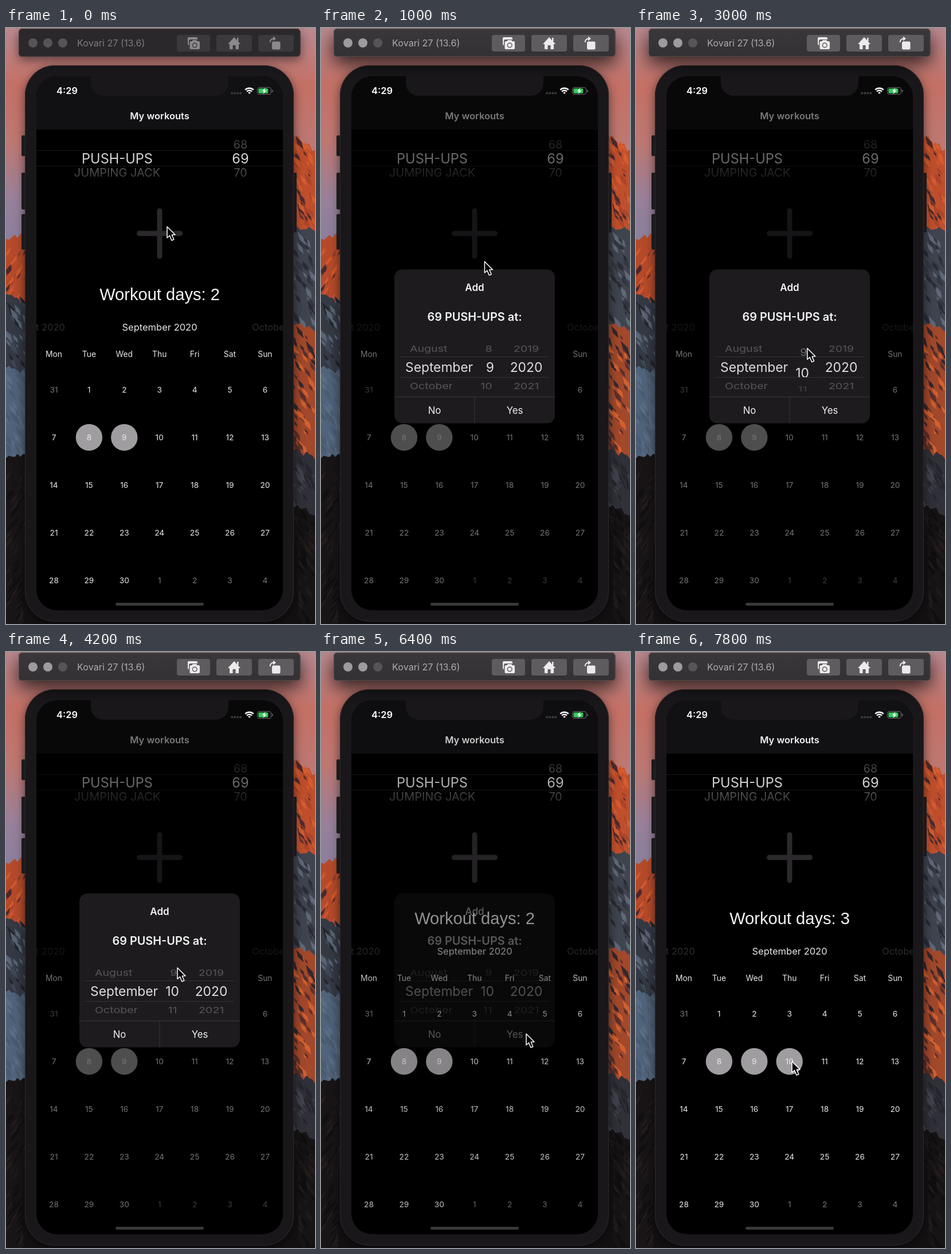
Animation of 539x1038 px, one loop 8000 ms. Source, as an HTML page with a canvas:

```html
<!DOCTYPE html>
<html lang="en">
<head>
<meta charset="utf-8">
<title>My workouts</title>
<style>
  html, body { margin: 0; width: 100%; height: 100%; overflow: hidden; background: #000; }
  canvas { display: block; }
</style>
</head>
<body>
<canvas id="stage" width="539" height="1038"></canvas>
<script>
const W = 539, H = 1038, MID = 268, LOOP = 8000, STEP = 200;
const stage = document.getElementById('stage').getContext('2d');
let c = stage;

const span = (t, from, to) => Math.min(1, Math.max(0, (t - from) / (to - from)));
const ease = p => p * p * (3 - 2 * p);
const easeOut = p => 1 - (1 - p) ** 2;

// Pointer moves: start, end, target x, target y
const MOVES = [
  [600, 1800, 298, 580], [2600, 3200, 299, 550], [4400, 5200, 360, 667],
  [6000, 6400, 358, 665], [6600, 7600, 272, 713]
];
const pointerAt = t => MOVES.reduce(([x, y], [from, to, tx, ty]) => {
  const p = ease(span(t, from, to));
  return [x + (tx - x) * p, y + (ty - y) * p];
}, [281, 346]);
const alertAt = t => easeOut(span(t, 200, 800)) - span(t, 6200, 6500);
const dayAt = t => 9 + ease(span(t, 2600, 3200));

function box(x, y, w, h, r, fill) {
  c.beginPath();
  c.roundRect(x, y, w, h, r);
  if (fill) { c.fillStyle = fill; c.fill(); }
}

function frame(x, y, w, h, r, color, width = 1) {
  box(x, y, w, h, r);
  c.strokeStyle = color;
  c.lineWidth = width;
  c.stroke();
}

function arc(x, y, r, from, to, color, width) {
  c.beginPath();
  c.arc(x, y, r, Math.PI * from, Math.PI * to);
  c.strokeStyle = color;
  c.lineWidth = width;
  c.stroke();
}

function dot(x, y, r, fill) {
  box(x - r, y - r, 2 * r, 2 * r, r, fill);
}

function poly(points, fill) {
  c.beginPath();
  points.forEach(p => c.lineTo(...p));
  c.closePath();
  c.fillStyle = fill;
  c.fill();
}

function line(x1, y1, x2, y2, color) {
  c.beginPath();
  c.moveTo(x1, y1);
  c.lineTo(x2, y2);
  c.strokeStyle = color;
  c.lineWidth = 1;
  c.stroke();
}

// Draws with a soft shadow below
function lifted(blur, drop, alpha, paint) {
  c.save();
  c.shadowColor = `rgba(0,0,0,${alpha})`;
  c.shadowBlur = blur;
  c.shadowOffsetY = drop;
  paint();
  c.restore();
}

// y is the middle of the capitals
function text(s, x, y, size, color, align = 'center', weight = 400, font = 'Inter') {
  c.font = `${weight} ${size}px "${font}", sans-serif`;
  c.textAlign = align;
  c.fillStyle = color;
  c.fillText(s, x, y + size * .364);
}

function fade(y0, y1, ...colors) {
  const g = c.createLinearGradient(0, y0, 0, y1);
  colors.forEach((color, i) => g.addColorStop(i / (colors.length - 1), color));
  return g;
}

function paintScenery() {
  const layer = document.createElement('canvas');
  layer.width = W;
  layer.height = H;
  c = layer.getContext('2d');
  let seed = 11;
  const rnd = (n = 1) => (seed = seed * 16807 % 2147483647) / 2147483647 * n;

  // A ridge with a ragged top, flecked with slanting rocks
  const ridge = (x, y, depth, slope, fill, ...rocks) => {
    const top = [...Array(9).keys()].map(i => [x + i * 5, y + slope * i * 5 + rnd(10) - 5]);
    poly([...top, [x + 40, H], [x, H]], fill);
    for (let i = 0; i < depth / 4; i++) {
      const px = x + rnd(40), py = y + 14 + rnd(depth - 14), s = 2 + rnd(6), lean = slope < 0 ? -s : s;
      poly([[px - lean, py - s * 1.6], [px + s * .6, py], [px + lean, py + s * 1.8], [px - s * .5, py + s * .4]],
        rocks[i % rocks.length]);
    }
  };

  c.fillStyle = fade(0, 400, '#b98a90', '#c47065', '#bd7872', '#98809a', '#857f9d');
  c.fillRect(0, 0, W, H);
  ridge(0, 372, 110, -.5, '#b54a2b', '#d2592d', '#4a2828', '#8e3c2b');
  ridge(0, 462, 140, .5, '#343944', '#23252d', '#596474', '#3f4755');
  ridge(0, 590, 170, .3, '#50637a', '#495b70', '#5a6d84');
  ridge(0, 750, 290, -.2, '#191516', '#110f10', '#231d1e');
  ridge(499, 184, 160, .75, '#bf4f2c', '#d75c30', '#4d2b2c', '#a8452c');
  ridge(499, 345, 170, .2, '#3f444f', '#292b33', '#5f6878', '#333741');
  ridge(499, 512, 220, .3, '#a2482b', '#d2602f', '#33272c', '#5a2f2b');
  ridge(499, 735, 100, .3, '#303039', '#25252c', '#41424c');
  ridge(499, 830, 210, .4, '#171415', '#100e0f', '#211b1c');
  c.fillStyle = '#141113';
  c.fillRect(30, 900, 480, H);
  c = stage;
  return layer;
}
const scenery = paintScenery();

function toolbar(active) {
  const edge = active ? '#504d50' : '#403d40', off = '#575457', on = active ? '#9d9b9d' : off;
  const key = active ? '#5f5c5f' : '#3c393c', ink = active ? '#ecebec' : '#8b898b';
  lifted(active ? 32 : 18, active ? 12 : 6, active ? .75 : .5, () =>
    box(22, 1, 491.5, 49, 6, active ? fade(1, 50, '#3a373a', '#343134') : '#2b282b'));
  frame(22.5, 1.5, 490.5, 48, 6, edge);
  [on, on, off].forEach((fill, i) => dot(47 + 26 * i, 26, 8, fill));
  text('Kovari 27 (13.6)', 124, 26.5, 16.2, active ? '#adabad' : '#7d7b7d', 'left');
  [[298, 58], [367, 62], [440, 62]].forEach(([x, w]) => box(x, 12, w, 29, 4, key));

  // camera
  box(317, 16, 17, 14, 2, ink);
  box(319, 20, 20, 18, 3, key);
  box(320.5, 23, 17.5, 14, 2, ink);
  box(325, 21, 8, 5, 1, ink);
  arc(329.2, 30, 3.8, 0, 2, key, 1.4);

  // house
  poly([[387, 28], [398, 16], [409, 28]], ink);
  box(390, 27, 16, 10, 1, ink);
  box(395.5, 30, 5, 7, 0, key);
  box(403, 17, 2.5, 6, 0, ink);

  // rotate
  box(464, 23.5, 14.5, 14, 2.5, ink);
  arc(467, 25, 6.5, 1, 1.5, ink, 2);
  poly([[466, 14.5], [471, 18.5], [466, 22.5]], ink);
}

function phoneBody() {
  [[27, 187, 36], [27, 252, 64], [27, 324, 62], [499, 252, 104]].forEach(([x, y, h]) => box(x, y, 8, h, 2, '#232124'));
  lifted(18, 5, .55, () => box(33, 65, 469, 969, 52, '#19171a'));
  frame(33.5, 65.5, 468, 968, 51.5, '#2c2a2d');
}

function picker() {
  [213.5, 240.5].forEach(y => line(53, y, 483, y, '#1b1a1c'));
  text('PUSH-UPS', 194, 227.5, 23.6, '#d5d5d6');
  text('69', 409, 227.5, 23.6, '#d5d5d6');
  text('68', 409, 203, 19.6, fade(194, 212, '#343335', '#59585a'));
  text('JUMPING JACK', 194, 252, 20, fade(243, 261, '#59585a', '#3a393b'));
  text('70', 409, 252, 19.6, fade(243, 261, '#59585a', '#3a393b'));
}

function calendar(count) {
  const colX = i => 83.5 + 61.4 * i;
  text('Workout days: ' + count, MID, 463, 29.1, '#f4f4f4', 'center', 400, 'Liberation Sans');
  text('September 2020', MID, 521, 16.5, '#e6e6e6');
  text('August 2020', 103, 521, 16.5, '#2d2c2e', 'right');
  text('October 2020', 429, 521, 16.5, '#2d2c2e', 'left');
  ['Mon', 'Tue', 'Wed', 'Thu', 'Fri', 'Sat', 'Sun'].forEach((d, i) => text(d, colX(i), 568, 13.9, '#e6e6e6'));
  for (let i = 0; i < count; i++) dot(colX(1 + i), 713, 23.2, '#a09da0');
  for (let i = 0; i < 35; i++) {
    const inMonth = i > 0 && i < 31;
    text(i ? (i - 1) % 30 + 1 : 31, colX(i % 7), 630.5 + 83 * Math.floor(i / 7), 13.7, inMonth ? '#e9e9e9' : '#7a797b');
  }
}

function app(count) {
  box(53, 84, 430, 930, 0, '#000');
  box(53, 84, 430, 92, 0, '#111013');
  line(53, 176, 483, 176, '#1a191b');
  text('My workouts', MID, 153, 16.5, '#f2f2f2', 'center', 600);
  picker();
  box(228, 353.3, 80, 9, 4.5, '#2b292c');
  box(263.5, 314, 9, 88, 4.5, '#2b292c');
  calendar(count);
}

function clipped(rects, paint) {
  c.save();
  c.beginPath();
  rects.forEach(([y, h]) => c.rect(128, y, 280, h));
  c.clip();
  paint();
  c.restore();
}

// One wheel column: a flat bright label between the lines, a bent dim one outside
function wheel(label, pos, xIn, xOut, align, alpha) {
  for (let k = Math.round(pos) - 2; k <= Math.round(pos) + 2; k++) {
    const angle = (k - pos) * .95, cos = Math.cos(angle), y = 591 + 40 * Math.sin(angle);
    if (cos < .1) continue;
    clipped([[573, 35.5]], () => text(label(k), xIn, y, 22.8, '#dededf', align));
    clipped([[535, 37.5], [609, 30]], () => {
      c.globalAlpha = alpha * .52 * cos;
      c.translate(xOut, y);
      c.scale(1, Math.sqrt(cos));
      text(label(k), 0, 0, 19.6, '#dededf', align);
    });
  }
}

function alertBox(alpha, scale, day) {
  const months = ['August', 'September', 'October'], mid = 554.5;
  c.save();
  c.globalAlpha = alpha;
  c.translate(MID, mid);
  c.scale(scale, scale);
  c.translate(-MID, -mid);
  box(128, 420.5, 280, 268, 14, '#1d1b1e');
  text('Add', MID, 451.5, 17, '#f4f4f4', 'center', 600);
  text('69 PUSH-UPS at:', MID, 502.5, 19.9, '#f4f4f4', 'center', 600);
  wheel(k => months[k] || '', 1, 147, 155, 'left', alpha);
  wheel(k => k, day, 302, 298.5, 'right', alpha);
  wheel(k => 2020 + k, 0, 358, 358, 'center', alpha);
  [572.5, 608.5].forEach(y => line(138, y, 398, y, '#343235'));
  line(128, 642.5, 408, 642.5, '#39373a');
  line(MID, 642.5, MID, 688.5, '#39373a');
  text('No', 198, 666, 16.8, '#f0f0f0');
  text('Yes', 338, 666, 16.8, '#f0f0f0');
  c.restore();
}

function statusBar() {
  text('4:29', 106.5, 109.5, 16.4, '#fff', 'center', 600);
  for (let i = 0; i < 4; i++) dot(394.2 + 5 * i, 113.6, 2, '#3d3c3e');
  [2, 6.2, 10.3].forEach(r => arc(424.5, 115, r, 1.25, 1.75, '#fff', 2.4));
  frame(438.5, 103.5, 24, 12, 3.5, '#6b6a6c');
  box(464, 107.5, 1.6, 4.5, 1, '#6b6a6c');
  box(440.3, 105.3, 17, 8.5, 2, '#35c759');
  poly([[452.5, 104], [446.5, 110.3], [450, 110.3], [448.3, 115.3], [454.5, 108.7], [451, 108.7]], '#fff');
}

function notch() {
  box(148, 83, 240, 35, [0, 0, 22, 22], '#19171a');
}

function pointer(x, y) {
  c.save();
  c.translate(x, y);
  poly([[0, 0], [0, 19.5], [4.4, 15.6], [8, 24], [11.8, 22.3], [8.3, 14.3], [14, 14]], '#050505');
  c.strokeStyle = '#fff';
  c.lineWidth = 1.5;
  c.lineJoin = 'round';
  c.stroke();
  c.restore();
}

function draw(now) {
  const t = Math.floor(now % LOOP / STEP) * STEP, shown = alertAt(t);
  c.drawImage(scenery, 0, 0);
  phoneBody();
  toolbar(t >= STEP);

  c.save();
  box(53, 84, 430, 930, 36);
  c.clip();
  app(t < 6600 ? 2 : 3);
  c.fillStyle = `rgba(0,0,0,${.5 * shown})`;
  c.fillRect(53, 84, 430, 930);
  // it settles from a larger size, but only fades when leaving
  if (shown > 0) alertBox(shown, t < LOOP / 2 ? 1 + .178 * (1 - shown) : 1, dayAt(t));
  statusBar();
  box(191, 1001, 154, 5, 2.5, '#39383a');
  c.restore();

  notch();
  pointer(...pointerAt(t));
  requestAnimationFrame(draw);
}
requestAnimationFrame(draw);
</script>
</body>
</html>
```
